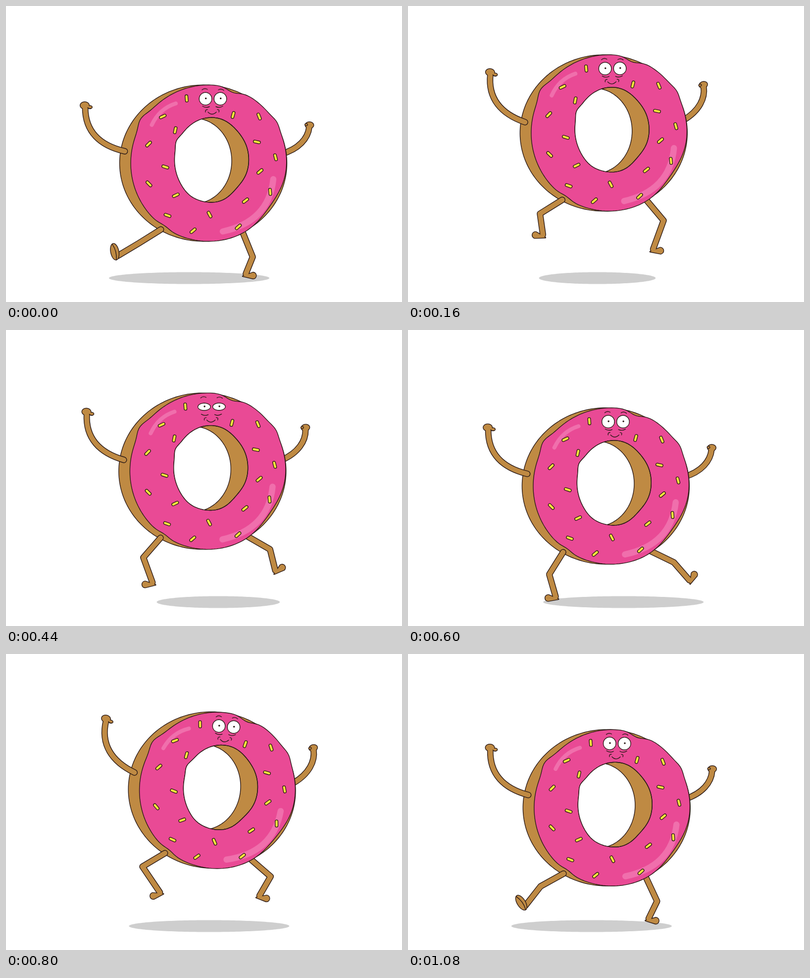
An HTML page with a canvas for the animation above (1.12 s loop, 800x600 px).

```html
<!DOCTYPE html>
<html lang="en">
<head>
<meta charset="utf-8">
<title>Dancing donut</title>
<style>
  html, body { margin: 0; width: 100%; height: 100%; overflow: hidden; background: #fff; }
  canvas { display: block; }
</style>
</head>
<body>
<canvas id="stage" width="800" height="600"></canvas>
<script>
const ctx = document.getElementById('stage').getContext('2d');
const LOOP = 1120, HALF = LOOP / 2, STEP = 40, RAD = Math.PI / 180;
const INK = '#2b1a17', DOUGH = '#bf8a43', PINK = '#e94a95', SHINE = '#f06fac', YELLOW = '#fbe53c';
const LINE = 1.4;

// Periodic cubic curve through the key poses
const POSES = [0, 160, 320, 440, 600, 800, 1080];
function posed(...values) {
  const n = POSES.length;
  const time = i => POSES[(i + n) % n] + LOOP * Math.floor(i / n);
  const value = i => values[(i + n) % n];
  const slope = i => (value(i + 1) - value(i - 1)) / (time(i + 1) - time(i - 1));
  return t => {
    let i = n - 1;
    while (POSES[i] > t) i--;
    const d = time(i + 1) - time(i), u = (t - time(i)) / d, v = 1 - u;
    return v * v * (1 + 2 * u) * value(i) + u * u * (3 - 2 * u) * value(i + 1)
      + d * u * v * (v * slope(i) - u * slope(i + 1));
  };
}

// Angles in degrees, lengths in pixels
const leftLeg = {
  side: -1, hip: [313, 453], thighLength: 53, bend: 110,
  thigh: posed(148, 148, 144, 131, 122, 149, 151),
  shin: posed(149, 82, 48, 70, 74, 56, 128),
  length: posed(49, 43, 60, 54, 47, 63, 49)
};
const rightLeg = {
  side: 1, hip: [471, 441], thighLength: 73, bend: -113,
  thigh: posed(68, 50, 37, 30, 26, 41, 65),
  shin: posed(112, 110, 117, 76, 49, 120, 116),
  length: posed(37, 62, 42, 44, 48, 45, 39)
};

// Two hops per loop: a high one with a quick take-off, a low leaning one with a late landing
function hop(t) {
  const first = t < HALF, u = (t % HALF) / HALF;
  const phase = first ? u + 0.35 * u * (1 - u) ** 3 : u - 1.2 * u ** 6 * (1 - u);
  const h = Math.sin(Math.PI * phase) ** 2;
  return {
    y: -h * (first ? 85 : 46),
    tilt: h * (first ? -1.05 : 4.4),
    raise: h * 20,
    shadow: first ? 162 - 48 * h ** 0.25 : 162
  };
}

// Ellipse with bumps given as [degrees, width, height]
function ring(cx, cy, rx, ry, bumps = []) {
  const path = new Path2D();
  for (let a = 0; a < 360; a += 2) {
    let r = 1;
    for (const [at, width, height] of bumps) {
      const off = (a - at + 540) % 360 - 180;
      r += height * Math.exp(-((off / width) ** 2));
    }
    path.lineTo(cx + rx * r * Math.cos(a * RAD), cy + ry * r * Math.sin(a * RAD));
  }
  path.closePath();
  return path;
}

const dough = ring(398.5, 318.5, 169, 158.5);
const icing = ring(409.5, 318.5, 157.5, 158.5,
  [[-71, 7, -0.045], [-31, 6, 0.02], [35, 20, -0.042], [125, 6, -0.02], [213, 7, 0.04]]);
const hole = ring(415.5, 312, 75, 86,
  [[-45, 22, -0.03], [45, 22, -0.055], [125, 18, 0.02], [205, 9, 0.05]]);
const backHole = ring(380, 314, 76, 86.5);

// Sprinkles as [place on the ring, turn]
const sprinkleRings = [
  { x: 418, y: 317, rx: 96.5, ry: 106, at: [[-65, 105], [-23, 12], [10, -40], [47, -38],
    [94, 62], [141, -25], [175, 18], [218, -78]] },
  { x: 414, y: 319, rx: 131, ry: 142, at: [[-42, 68], [-5, 75], [24, 85], [65, -42],
    [106, -40], [132, 20], [163, 45], [196, -45], [222, -25], [248, 85]] }
];
const sprinkle = new Path2D('M-4.500 0H4.500');

const face = new Path2D(`M396 170Q401 165.500 407 169M429 170Q435 166.500 440 171
  M397 203Q404 207.500 411 204M424 204Q431 207.500 438 203
  M408 215Q416 223.500 425 215M407 210Q402 210 403 215M427 210Q432 210 430 215`);
const leftArm = new Path2D('M160 206C160 255 190 283 240 294.500');
const rightArm = new Path2D('M612.500 246C610 268 592 290 556 300');

function line(path, color, width = LINE) {
  ctx.strokeStyle = color;
  ctx.lineWidth = width;
  ctx.stroke(path);
}

function fill(path, color) {
  ctx.fillStyle = color;
  ctx.fill(path);
}

function shape(path, color) {
  fill(path, color);
  line(path, INK);
}

// A tube and its end pieces under one shared outline
function limb(tube, ends) {
  line(tube, INK, 12.8);
  ends.forEach(end => line(end, INK, 2 * LINE));
  line(tube, DOUGH, 12.8 - 2 * LINE);
  ends.forEach(end => fill(end, DOUGH));
}

function placed(x, y, degrees, draw) {
  ctx.save();
  ctx.translate(x, y);
  ctx.rotate(degrees * RAD);
  draw();
  ctx.restore();
}

function turnAbout(x, y, degrees) {
  ctx.translate(x, y);
  ctx.rotate(degrees * RAD);
  ctx.translate(-x, -y);
}

function inBody(pose, draw) {
  placed(0, pose.y, 0, () => {
    turnAbout(398, 561, pose.tilt);
    draw();
  });
}

const step = ([x, y], degrees, distance) =>
  [x + distance * Math.cos(degrees * RAD), y + distance * Math.sin(degrees * RAD)];

function leg(t, pose, part) {
  const [dx, dy] = [part.hip[0] - 398, part.hip[1] - 561];
  const turn = Math.atan2(dy, dx) / RAD + pose.tilt;
  const hip = step([398, 561 + pose.y], turn, Math.hypot(dx, dy));
  const knee = step(hip, part.thigh(t), part.thighLength);
  const shin = part.shin(t), dir = shin + part.bend;
  const ankle = step(knee, shin, part.length(t));
  const tube = new Path2D();
  [hip, knee, ankle].forEach(p => tube.lineTo(...p));

  // A high back kick shows the sole
  if (part.side < 0 && shin > 115) {
    limb(tube, []);
    placed(...step(step(ankle, shin, 5), dir, 11), dir + 90, () => {
      shape(ring(0, 0, 8.3, 17), DOUGH);
      line(new Path2D('M-2 -16Q5 0 0 17'), INK);
    });
    return;
  }
  const foot = new Path2D();
  foot.moveTo(...step(step(ankle, shin, 5), dir, -4.5));
  foot.arc(...step(step(ankle, shin, 4), dir, 16), 6.2, (dir - 90) * RAD, (dir + 90) * RAD);
  foot.closePath();
  limb(tube, [foot]);
}

function donut(t) {
  shape(dough, DOUGH);
  shape(icing, PINK);
  line(new Path2D('M294.500 241Q310 208 343 197.500'), SHINE, 8);
  line(new Path2D('M540 351Q531 437 438 457'), SHINE, 12.5);

  shape(hole, DOUGH);
  ctx.save();
  ctx.clip(hole);
  shape(backHole, '#fff');
  ctx.restore();
  line(hole, INK);

  for (const { x, y, rx, ry, at } of sprinkleRings) {
    for (const [a, turn] of at) {
      placed(x + rx * Math.cos(a * RAD), y + ry * Math.sin(a * RAD), turn, () => {
        line(sprinkle, INK, 7);
        line(sprinkle, YELLOW, 4.3);
      });
    }
  }

  line(face, INK);
  const open = Math.min(1, Math.max(0.15, Math.abs(t - 480) / 80 + 0.08));
  for (const x of [403, 433]) {
    shape(ring(x, 188, 12.7, 12.7 * open), '#fff');
    fill(ring(x + 0.7, 187.3, 1.7, Math.min(1.7, 8 * open)), INK);
  }
}

function draw(t) {
  const pose = hop(t);
  ctx.clearRect(0, 0, 800, 600);
  fill(ring(403 - 33 * Math.cos(2 * Math.PI * t / LOOP), 551.5, pose.shadow, 12), '#cecece');

  inBody(pose, () => {
    turnAbout(536, 280, -pose.raise);
    limb(rightArm, [ring(613, 241.5, 8, 6)]);
    shape(ring(606.5, 240.5, 2.8, 2.3), DOUGH);
  });
  leg(t, pose, rightLeg);
  inBody(pose, () => {
    donut(t);
    turnAbout(240, 294, pose.raise * 0.48);
    limb(leftArm, [ring(159, 201.5, 8.6, 6.6), ring(169.5, 205, 4, 2.4)]);
    line(new Path2D('M165 206Q168 209 172 207.500'), INK);
  });
  leg(t, pose, leftLeg);
}

ctx.lineCap = ctx.lineJoin = 'round';
const start = performance.now();
function tick() {
  const t = (performance.now() - start) % LOOP;
  draw(Math.floor(t / STEP) * STEP);
  requestAnimationFrame(tick);
}
tick();
</script>
</body>
</html>
```
